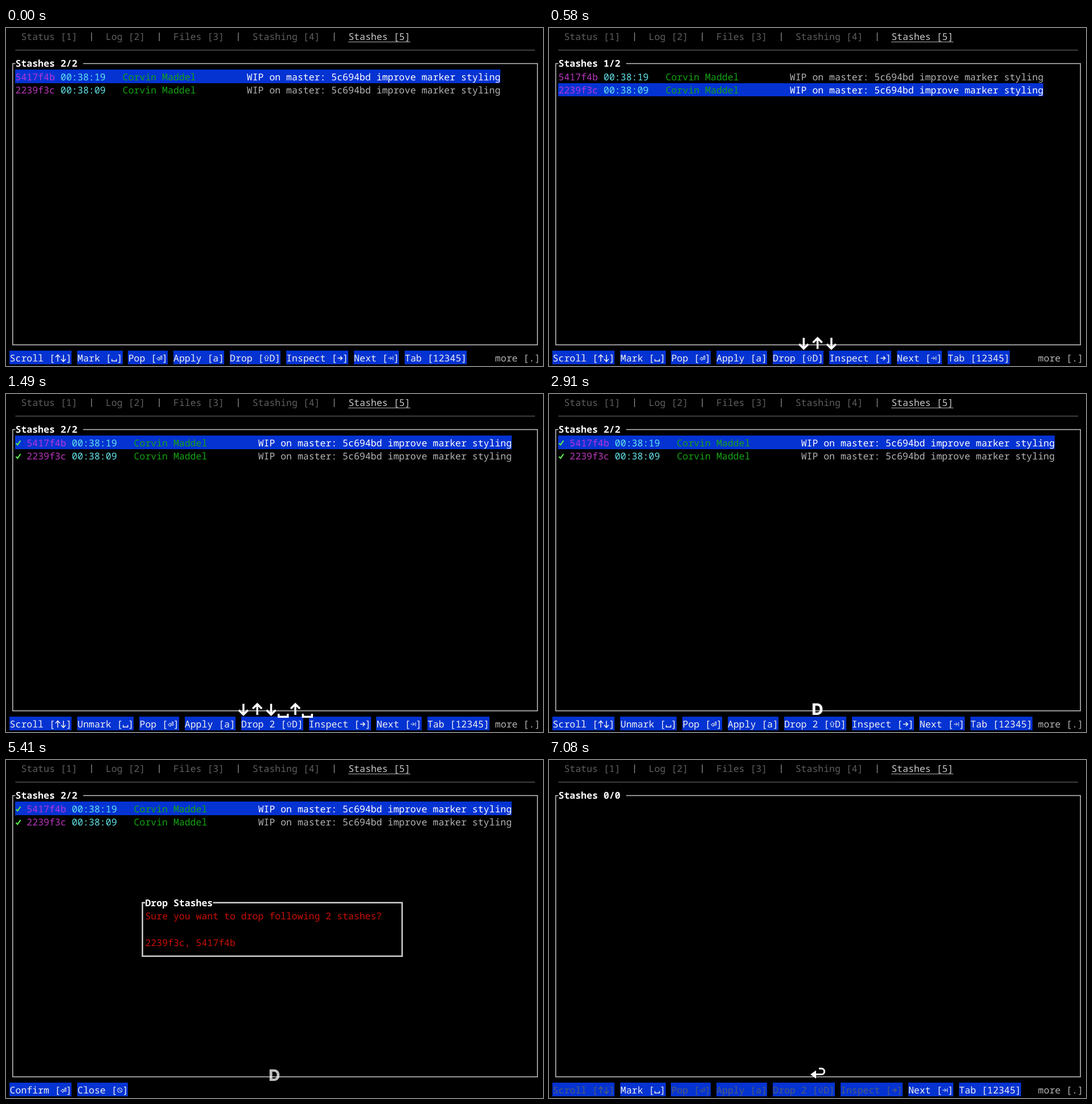
Recreate the animation shown at these times as an HTML page. Size 943 by 594 pixels, loop 7180 ms.

```html
<!DOCTYPE html>
<html lang="en">
<head>
<meta charset="utf-8">
<title>Stash list</title>
<style>
  html, body { margin: 0; width: 100%; height: 100%; overflow: hidden; background: #000; }
  svg { display: block; width: 943px; height: 594px; }
  text {
    font: 16.517px "Noto Sans Mono", "DejaVu Sans Mono", monospace;
    white-space: pre;
    text-rendering: geometricPrecision;
  }
  .bold { font-weight: 700; }
  .key { font: 800 28px Inter, "Open Sans", sans-serif; text-anchor: middle; }
  path { fill: none; }
  rect { shape-rendering: crispEdges; }
  .layer { animation: 7180ms step-end infinite; }
</style>
</head>
<body>
<svg id="stage" viewBox="0 0 943 594"></svg>
<script>
const LOOP = 7180;
const CELL = 9.91, LINE = 23.54;
const BLUE = '#0433d2', WHITE = '#f0f0f0', GREY = '#b4b4b4', DIM = '#5e5e5e';
const stage = document.getElementById('stage');
const sheet = document.head.appendChild(document.createElement('style')).sheet;

const colX = c => 6.6 + c * CELL;
const rowY = r => 15.3 + r * LINE;   // centre of a text row

// Symbols inside one cell: x from 0 to 10, y around the row centre
const GLYPHS = {
  '↑': 'M5 6V-6M1 -1.5L5 -6L9 -1.5',
  '↓': 'M5 -6V6M1 1.5L5 6L9 1.5',
  '→': 'M1 0H9M5.5 -3.5L9 0L5.5 3.5',
  '␣': 'M1 1.5V5H9V1.5',
  '⏎': 'M.5 1L4.5 -2V0H7.5V-4H9.5V2H4.5V4Z',
  '⇧': 'M5 -5L9 -.5H7V4.5H3V-.5H1Z',
  '⇥': 'M.5 0H7M4 -3L7 0L4 3M9 -3.5V3.5',
  '⎋': 'M1 0A4 4 0 1 0 9 0A4 4 0 1 0 1 0M2.2 -2.8L7.8 2.8',
  '✓': 'M1 .5L3.8 3.5L9 -4'
};
const THIN = '⏎⇧⇥⎋';

function add(parent, tag, attrs, text) {
  const el = document.createElementNS('http://www.w3.org/2000/svg', tag);
  for (const name in attrs) el.setAttribute(name, attrs[name]);
  if (text) el.textContent = text;
  return parent.appendChild(el);
}

function stroke(parent, d, color, width, attrs) {
  return add(parent, 'path', { d, stroke: color, 'stroke-width': width, ...attrs });
}

function write(parent, str, col, row, fill, cls = '') {
  let plain = '';
  [...str].forEach((ch, i) => {
    const d = GLYPHS[ch];
    plain += d ? ' ' : ch;
    if (!d) return;
    const width = ch === '✓' ? 2.1 : THIN.includes(ch) ? 1 : 1.5;
    stroke(parent, d, fill, width, { transform: `translate(${colX(col + i)} ${rowY(row)})` });
  });
  if (plain.trim()) add(parent, 'text', { x: colX(col), y: rowY(row) + 6, fill, class: cls }, plain);
}

function block(parent, col, row, cells) {
  add(parent, 'rect', { x: colX(col) - .3, y: rowY(row) - LINE / 2 - 1, width: cells * CELL, height: LINE, fill: BLUE });
}

// A group whose opacity jumps at the given times in ms
let count = 0;
function layer(steps) {
  const name = 'show' + count++;
  const frames = Object.entries({ 0: 0, ...steps })
    .map(([ms, opacity]) => `${ms / LOOP * 100}% { opacity: ${opacity} }`);
  sheet.insertRule(`@keyframes ${name} { ${frames.join(' ')} }`);
  return add(stage, 'g', { class: 'layer', style: `animation-name: ${name}` });
}

function frame() {
  ['Status [1]', 'Log [2]', 'Files [3]', 'Stashing [4]'].reduce((col, tab) => {
    write(stage, tab, col, 0, DIM);
    const bar = col + tab.length + 2;
    stroke(stage, `M${colX(bar + .5)} 8V23`, '#858585', 1.4);
    return bar + 3;
  }, 2);
  write(stage, 'Stashes [5]', 60, 0, '#c8c8c8');
  stroke(stage, 'M601 24.5H710', '#b0b0b0', 1.2);
  stroke(stage, `M16.5 ${rowY(1)}H929`, '#636363', 1.4);
  stroke(stage, `M135.5 ${rowY(2)}H933.3V${rowY(23)}H11.8V${rowY(2)}H16.5`, '#c4c4c4', 1.5);
}

function list(steps, title, selected, marks) {
  const g = layer(steps);
  write(g, 'Stashes ' + title, 1, 2, '#fff', 'bold');
  if (!marks) return;
  const col = marks.includes('✓') ? 3 : 1;
  [['5417f4b', '00:38:19'], ['2239f3c', '00:38:09']].forEach(([hash, time], i) => {
    const row = 3 + i, on = i === selected;
    if (on) block(g, 1, row, col + 85);
    write(g, marks[i], 1, row, '#58ec4c');
    write(g, hash, col, row, on ? '#b836dc' : '#b835bd');
    write(g, time, col + 8, row, '#62e4ea');
    write(g, 'Corvin Maddel', col + 19, row, '#14a313');
    write(g, 'WIP on master: 5c694bd improve marker styling', col + 41, row, on ? '#fff' : GREY);
  });
}

function bar(steps, items, dimmed = []) {
  const g = layer(steps);
  items.reduce((col, item, i) => {
    block(g, col, 24, item.length);
    write(g, item, col, 24, dimmed.includes(i) ? '#4f5b74' : WHITE);
    return col + item.length + 1;
  }, 0);
}

const commands = (mark, drop) => ['Scroll [↑↓]', mark + ' [␣]', 'Pop [⏎]', 'Apply [a]',
  drop + ' [⇧D]', 'Inspect [→]', 'Next [⇥]', 'Tab [12345]'];

function popup(steps) {
  const g = layer(steps);
  const [top, bottom] = [rowY(10), rowY(14)];
  stroke(g, `M363.5 ${top}H695.6V${bottom}H239.6V${top}H244.4`, '#cfcfcf', 2.5);
  write(g, 'Drop Stashes', 24, 10, '#fff', 'bold');
  write(g, 'Sure you want to drop following 2 stashes?', 24, 11, '#c90f06');
  write(g, '2239f3c, 5417f4b', 24, 13, '#c90f06');
}

// Pressed keys, centred at the foot of the window
const KEYS = {
  '↓': [24.3, 'M0 544.5V563M-8 555.5L0 563.5L8 555.5'],
  '↑': [24.3, 'M0 564V545.5M-8 553L0 545L8 553'],
  '␣': [18.2, 'M-8 562V567.2H8V562']
};

function keys(steps, str) {
  const g = layer(steps);
  const list = [...str].map(ch => KEYS[ch]);
  let x = 471.6 - list.reduce((sum, [w]) => sum + w, 0) / 2;
  for (const [w, d] of list) {
    stroke(g, d, '#fff', 3.5, { transform: `translate(${x + w / 2} 0)` });
    x += w;
  }
}

frame();

list({ 0: 1, 160: 0, 410: 1, 580: 0 }, '2/2', 0, ['', '']);
list({ 160: 1, 410: 0, 580: 1, 1080: 0 }, '1/2', 1, ['', '']);
list({ 1080: 1, 1410: 0 }, '1/2', 1, ['', '✓']);
list({ 1410: 1, 1490: 0 }, '2/2', 0, ['', '✓']);
list({ 1490: 1, 6990: 0 }, '2/2', 0, ['✓', '✓']);
list({ 6990: 1 }, '0/0');

bar({ 0: 1, 1080: 0 }, commands('Mark', 'Drop'));
bar({ 1080: 1, 1410: 0 }, commands('Unmark', 'Drop 1'));
bar({ 1410: 1, 1490: 0 }, commands('Mark', 'Drop 1'));
bar({ 1490: 1, 2990: 0 }, commands('Unmark', 'Drop 2'));
bar({ 2990: 1, 6990: 0 }, ['Confirm [⏎]', 'Close [⎋]']);
bar({ 6990: 1 }, commands('Mark', 'Drop 2'), [0, 2, 3, 4, 5]);
write(layer({ 0: 1, 2990: 0, 6990: 1 }), 'more [.]', 86, 24, GREY);

popup({ 2990: 1, 6990: 0 });

keys({ 80: 1, 330: 0 }, '↓');
keys({ 330: 1, 500: 0 }, '↓↑');
keys({ 500: 1, 1000: 0 }, '↓↑↓');
keys({ 1000: 1, 1410: 0 }, '↓↑↓␣');
keys({ 1410: 1, 1490: 0 }, '↓↑↓␣↑');
keys({ 1490: 1, 2910: 0 }, '↓↑↓␣↑␣');

const letter = layer({ 2910: 1, 5410: .75, 5490: .5, 5580: .25, 5660: 0 });
add(letter, 'text', { x: 471.3, y: 564, fill: '#fff', class: 'key' }, 'D');

const enter = layer({ 6910: 1 });
stroke(enter, 'M474 542.3H478.5A5.1 5.1 0 0 1 478.5 552.5H467', '#fff', 3);
add(enter, 'polygon', { points: '459,552.5 469,545.5 469,560', fill: '#fff' });
</script>
</body>
</html>
```
